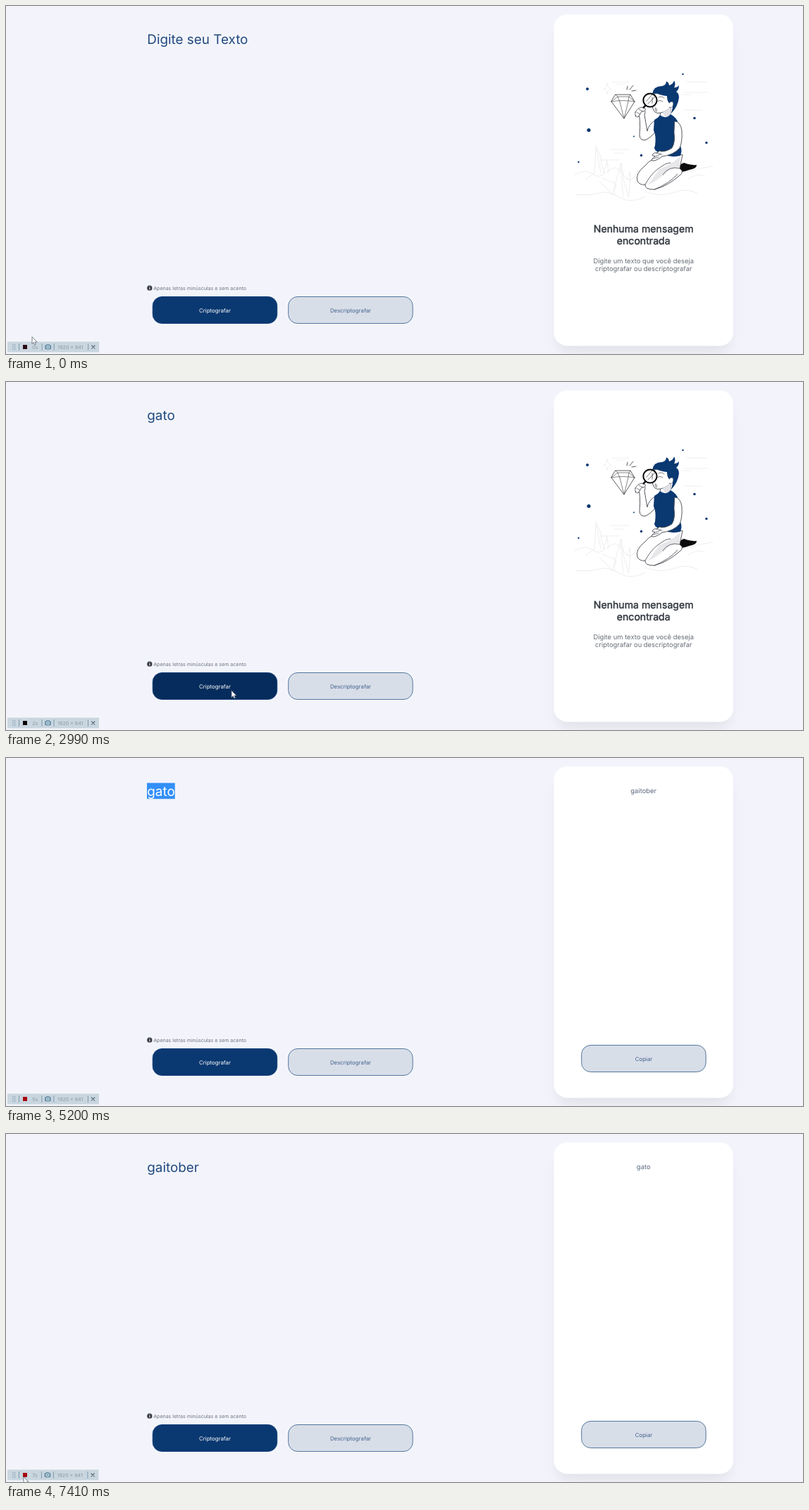
An HTML page with a canvas that plays this animation: 1131x495 px, repeating every 7.54 s.

```html
<!DOCTYPE html>
<html lang="pt-BR">
<head>
<meta charset="utf-8">
<title>Criptografador de texto</title>
<style>
  html, body { margin: 0; width: 100%; height: 100%; overflow: hidden; background: #f3f4fb; }
  canvas { display: block; width: 100%; height: 100%; }
</style>
</head>
<body>
<canvas id="stage"></canvas>
<script>
const W = 1131, H = 495, LOOP = 7540;
const REM = 16 * W / 1920;
const NAVY = '#0a3871', PALE = '#d8dee8', INK = '#343a40', GRAY = '#666d75';
const canvas = document.getElementById('stage');
const ctx = canvas.getContext('2d');
const dpr = window.devicePixelRatio || 1;
canvas.width = W * dpr;
canvas.height = H * dpr;

// Each cue changes part of the state and holds until the next one.
const CUES = [
  [0, { typed: '', caret: false, selected: false, hover: '', output: '', mouse: [37, 471], sec: 0, rec: '#2b0a14' }],
  [130, { mouse: [95, 330] }],
  [390, { mouse: null }],
  [780, { caret: true }],
  [1040, { sec: 1, rec: '#1c0710' }],
  [1300, { typed: 'g' }],
  [1560, { typed: 'ga' }],
  [1820, { typed: 'gato' }],
  [2080, { sec: 2, rec: '#080306' }],
  [2340, { caret: false }],
  [2990, { hover: 'encrypt', mouse: [320, 439] }],
  [3120, { sec: 3, output: 'gaitober' }],
  [3640, { hover: '', mouse: [929, 432], rec: '#a80410' }],
  [3900, { hover: 'copy' }],
  [4030, { sec: 4 }],
  [4160, { hover: '' }],
  [4420, { mouse: null, selected: true }],
  [5070, { sec: 5 }],
  [5330, { typed: 'gaitober', selected: false, caret: true }],
  [5590, { caret: false, hover: 'decrypt', mouse: [482, 447] }],
  [5850, { output: 'gato' }],
  [6240, { sec: 6, hover: '', mouse: [300, 468] }],
  [7020, { sec: 7, mouse: [62, 478] }],
  [7280, { mouse: [25, 488] }]
];

const stateAt = t => Object.assign({}, ...CUES.filter(c => c[0] <= t).map(c => c[1]));

function text(str, x, y, size, color, align = 'left') {
  ctx.font = `400 ${size}px Inter, "Liberation Sans", sans-serif`;
  ctx.textAlign = align;
  ctx.fillStyle = color;
  ctx.fillText(str, x, y);
  return ctx.measureText(str).width;
}

function box(x, y, w, h, r, fill, stroke) {
  ctx.beginPath();
  ctx.roundRect(x, y, w, h, r);
  ctx.fillStyle = fill;
  ctx.fill();
  if (stroke) {
    ctx.strokeStyle = stroke;
    ctx.lineWidth = 1;
    ctx.stroke();
  }
}

function dot(x, y, r, color) {
  ctx.beginPath();
  ctx.arc(x, y, r, 0, Math.PI * 2);
  ctx.fillStyle = color;
  ctx.fill();
}

function path(d, fill, stroke, width = 0.8) {
  const p = new Path2D(d);
  if (fill) {
    ctx.fillStyle = fill;
    ctx.fill(p);
  }
  if (stroke) {
    ctx.strokeStyle = stroke;
    ctx.lineWidth = width;
    ctx.stroke(p);
  }
}

function button(label, x, y, fill, color, border) {
  box(x, y, 176.5, 38, 13, fill, border);
  text(label, x + 88.3, y + 22.4, REM * 0.833, color, 'center');
}

function scenery() {
  const faint = '#e9e9ec';
  path('M860 108H884M866 111H878M966 108H994M962 123H996M958 126H974M964 148H988M845 219H870M857 204H884M863 209H876', null, faint, 0.7);
  path('M853 110Q854 117 859 118Q854 119 853 125Q852 119 848 118Q853 117 853 110', null, faint, 0.7);
  path('M807 240Q822 231 832 239T854 235T876 240T897 234M808 268Q830 270 842 266T870 272T908 271M910 265Q930 272 948 265T982 267M963 238Q980 231 1003 228M968 246Q982 237 992 242M822 247L836 237', null, faint, 0.8);
  path('M835 238L837 199L843 212L848 237M838 204L844 237M848 238L853 220L855 237M862 263L873 223L877 249L884 272M872 226L876 272M842 249L862 269L866 253L846 245M881 246L886 236L884 270', null, faint, 0.8);
}

function diamond() {
  const line = '#333';
  path('M865 126H886L892 136L877 160L859 136Z', '#fff', line, 0.8);
  path('M859 136L868 129H884L892 136M865 126L868 129L871 136L877 160L883 136L884 129L886 126M859 136Q876 133 892 136', null, line, 0.6);
  path('M881 119L882 114M885 119L890 113M888 121L894 120', null, line, 0.8);
}

function seeker() {
  const line = '#42464d', white = '#fff';
  // shoe and legs
  path('M952 233Q955 225 962 223Q971 227 980 226Q981 231 970 233Q962 236 957 236Z', '#0b0b0d');
  path('M933 211Q916 216 906 228Q893 238 896 249Q899 255 907 254Q906 261 920 261Q939 256 956 241Q963 236 956 231L960 212Z', white, line, 0.9);
  path('M927 232Q945 225 957 214L956 231Q947 228 940 234Q924 249 911 255Q920 242 927 232Z', '#e8e8eb');
  path('M907 254Q916 237 929 229Q936 223 943 223M956 231Q941 227 932 240M920 261Q942 252 953 239', null, line, 0.8);
  // raised arm
  path('M921 163Q912 168 910 178L906 155Q909 148 903 146L897 150Q901 160 899 184Q900 193 909 190Q919 184 925 174Z', white, line, 0.9);
  // neck and face
  path('M929 148L928 158Q936 164 943 156L943 145Z', white, line, 0.8);
  path('M920 125Q915 136 918 146Q920 154 929 152Q938 150 943 143L946 130Q937 119 920 125Z', white, line, 0.9);
  path('M932 151Q941 147 943 141L943 156Q938 160 935 158Z', '#e2e2e6');
  path('M924 136Q928 133 932 136M926 130Q930 127 934 131', null, line, 0.7);
  path('M922 145Q925 147 923 150Q920 149 922 145', null, line, 0.7);
  path('M941 138Q947 133 947 140Q946 146 941 144', white, line, 0.7);
  // hair
  path('M917 125Q919 114 930 114Q937 113 937 107Q941 109 941 113Q947 111 948 106Q951 111 948 116Q953 116 955 113Q955 119 951 122Q955 124 955 130Q954 142 944 153Q946 144 947 139Q946 133 941 138Q938 135 938 128Q929 127 923 124Z', NAVY);
  // shirt
  path('M920 162Q927 158 928 155Q936 162 943 154Q951 158 954 166L957 199Q960 205 957 213Q944 216 931 211Q917 205 921 199Q923 184 919 177Z', NAVY);
  // resting arm
  path('M949 164Q957 164 959 177Q960 193 956 202Q947 212 931 214Q922 221 917 220Q915 218 921 214L917 212Q919 208 924 209L927 206Q934 209 945 202Q950 194 948 180Z', white, line, 0.9);
  path('M921 214L929 211M918 217L926 215M923 209L931 211', null, line, 0.7);
  // magnifier in hand
  path('M907 142L894 156', null, '#222', 2.6);
  path('M893 151Q896 145 902 144L908 147Q906 151 902 150L897 158Q892 158 893 151Z', white, line, 0.8);
  path('M895 151L900 154M898 147L904 150', null, line, 0.7);
  ctx.beginPath();
  ctx.arc(914, 134, 9.6, 0, Math.PI * 2);
  ctx.fillStyle = 'rgba(255,255,255,.9)';
  ctx.fill();
  ctx.strokeStyle = '#0d0d10';
  ctx.lineWidth = 2;
  ctx.stroke();
  path('M909 135L917 126M911 139L921 129M917 130V138', null, '#555', 0.8);
}

function emptyPanel() {
  scenery();
  diamond();
  seeker();
  [[825, 118, 2], [827, 176.5, 2.6], [960.5, 97, 1.2], [977, 159.5, 1.8], [994, 194.5, 1.7],
   [901.5, 212.5, 1.7], [891, 185.5, 1], [812.5, 222, 1.2]].forEach(d => dot(...d, NAVY));

  const heading = (str, y) => {
    text(str, 904.7, y, REM * 1.5, INK, 'center');
    ctx.strokeStyle = INK;
    ctx.lineWidth = 0.45;
    ctx.strokeText(str, 904.7, y);
  };
  heading('Nenhuma mensagem', 321.5);
  heading('encontrada', 338.8);
  text('Digite um texto que você deseja', 904.7, 365.8, REM, GRAY, 'center');
  text('criptografar ou descriptografar', 904.7, 377.3, REM, GRAY, 'center');
}

function panel(s) {
  ctx.save();
  ctx.shadowColor = 'rgba(0,0,0,.08)';
  ctx.shadowBlur = 19 * dpr;
  ctx.shadowOffsetY = 14 * dpr;
  box(782.5, 17, 244.5, 461, 15, '#fff');
  ctx.restore();
  box(777.5, 12, 254.5, 471.5, 19, '#fff');
  if (!s.output) return emptyPanel();
  text(s.output, 904.7, 49.5, REM, '#5d6b80', 'center');
  button('Copiar', 816.7, 408.5, s.hover === 'copy' ? '#c5c6c6' : PALE, '#43628d', '#54779f');
}

function editor(s) {
  const x = 200.3, base = 53.7, size = REM * 2;
  ctx.font = `400 ${size}px Inter, "Liberation Sans", sans-serif`;
  const w = ctx.measureText(s.typed).width;
  if (s.selected) {
    ctx.fillStyle = '#338ffa';
    ctx.fillRect(200, 35.5, w + 0.3, 22.7);
  }
  text(s.typed || 'Digite seu Texto', x, base, size, s.selected ? '#fff' : '#20497d');
  if (s.caret) {
    ctx.fillStyle = '#33547f';
    ctx.fillRect(x + w, 36, 0.9, 22.5);
  }

  dot(203.8, 401.2, 3.6, INK);
  ctx.fillStyle = '#fff';
  ctx.fillRect(203.3, 399, 1.1, 1);
  ctx.fillRect(203.3, 400.7, 1.1, 2.6);
  text('Apenas letras minúsculas e sem acento', 209.2, 403.8, REM * 0.75, '#6c737c');

  button('Criptografar', 208.2, 413.5, s.hover === 'encrypt' ? '#052c5c' : NAVY, '#fff', '#123f78');
  button('Descriptografar', 400.7, 413.5, s.hover === 'decrypt' ? '#c5c6c6' : PALE, '#43628d', '#54779f');
}

function recorder(s) {
  const tone = '#8799a8', blue = '#6f96ad';
  const label = s.sec + 's';
  ctx.font = `400 ${REM * 0.75}px Inter, "Liberation Sans", sans-serif`;
  const shift = ctx.measureText(label).width - ctx.measureText('2s').width;
  const bar = x => path(`M${x} 480.5V489.5`, null, blue, 0.9);

  ctx.fillStyle = '#cad6df';
  ctx.fillRect(2, 477.5, 130 + shift, 15);
  for (let i = 0; i < 8; i++) {
    ctx.fillStyle = blue;
    ctx.fillRect(9.5 + (i % 2) * 2.6, 481 + (i >> 1) * 2.3, 1.1, 1.1);
  }
  bar(18.5);
  ctx.fillStyle = s.rec;
  ctx.fillRect(24, 482, 6, 6);
  text(label, 37.2, 487.6, REM * 0.75, tone);

  ctx.save();
  ctx.translate(shift, 0);
  bar(51);
  box(55, 482, 9, 6.4, 1.4, blue);
  box(57.2, 480.9, 4.6, 3, 1, blue);
  dot(59.5, 485, 2.3, '#dbe4ea');
  dot(59.5, 485, 1.3, blue);
  bar(68);
  text('1920 × 841', 73.2, 487.6, REM * 0.75, tone);
  bar(116.5);
  path('M121.6 483L125.8 487.2M125.8 483L121.6 487.2', null, '#4c6373', 1.1);
  ctx.restore();
}

function pointer([x, y]) {
  ctx.save();
  ctx.translate(x, y);
  path('M0 0V9.6L2.2 7.6L3.8 11L5.4 10.3L3.9 7H6.8Z', '#fff', '#5a6270', 0.8);
  ctx.restore();
}

function draw(now) {
  const s = stateAt(now % LOOP);
  ctx.setTransform(dpr, 0, 0, dpr, 0, 0);
  ctx.textRendering = 'geometricPrecision';
  ctx.lineJoin = 'round';
  ctx.lineCap = 'round';
  ctx.fillStyle = '#f3f4fb';
  ctx.fillRect(0, 0, W, H);
  panel(s);
  editor(s);
  recorder(s);
  if (s.mouse) pointer(s.mouse);
}

const start = performance.now();
(function tick() {
  draw(performance.now() - start);
  requestAnimationFrame(tick);
})();
</script>
</body>
</html>
```
